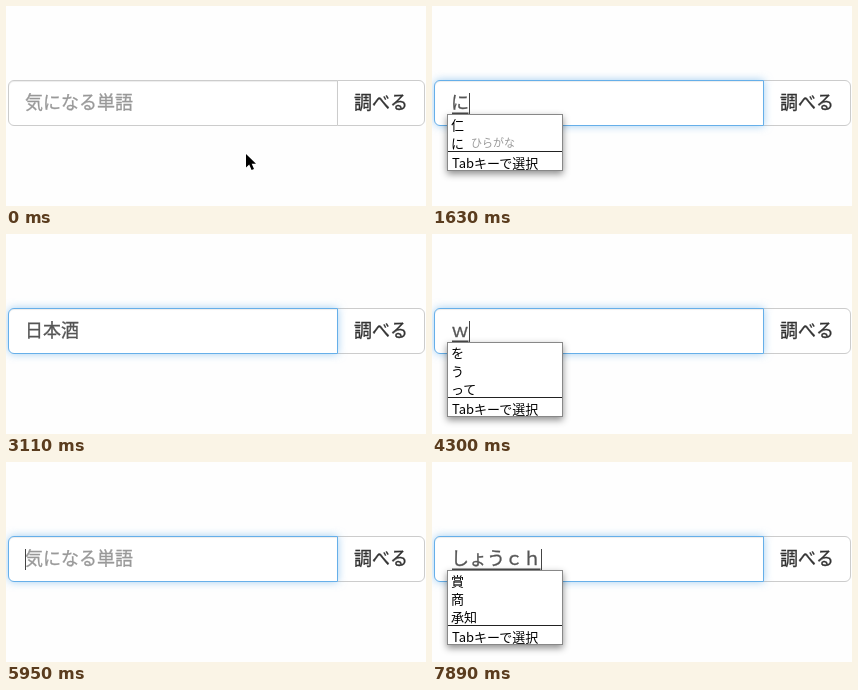
Recreate the animation shown at these times as an HTML page. Size 420 by 200 pixels, loop 8 s.

```html
<!DOCTYPE html>
<html lang="ja">
<meta charset="utf-8">
<style>
  html, body { margin: 0; width: 100%; height: 100%; overflow: hidden; background: #fefefe; }
  body { position: relative; font-family: "Noto Sans CJK JP", "Noto Sans CJK", sans-serif; }
  div { position: absolute; box-sizing: border-box; }
  svg { position: absolute; left: 0; top: 0; }
  #button, #field { top: 74px; height: 46px; border: 1px solid #ccc; background: #fff; }
  #button { left: 331px; width: 88px; border-radius: 0 6px 6px 0; }
  #field { left: 2px; width: 330px; border-radius: 6px 0 0 6px; }
  #popup { left: 15px; top: 108px; width: 116px; border: 1px solid #888; background: #fff;
    box-shadow: 0 3px 7px rgba(0, 0, 0, .45); }
  .big { font-size: 18px; stroke-width: .3px; }
  .row { font-size: 13px; }
</style>
<div id="button"></div>
<div id="field"></div>
<div id="popup"></div>
<svg width="420" height="200">
  <text class="big" x="348" y="103" fill="#333" stroke="#333">調べる</text>
  <g id="typed"></g>
  <g id="rows"></g>
  <path id="arrow" d="M0 0V13.5L3.2 10.6 5.6 16 8 15 5.7 9.8H10Z" stroke="#fff" stroke-width="1.2" paint-order="stroke"/>
  <g id="beam" fill="none">
    <path id="beamShape" d="M203 94.5Q206.5 94.5 206.5 97.5Q206.5 94.5 210 94.5M206.5 97V107M203 109.5Q206.5 109.5 206.5 106.5Q206.5 109.5 210 109.5M204.5 102.5H208.5" stroke="#fff" stroke-width="3"/>
    <use href="#beamShape" style="stroke:#222;stroke-width:1.3"/>
  </g>
</svg>
<script>
const $ = id => document.getElementById(id);
const LOOP = 8000;

// [start ms, text, caret shown, conversion candidates (present while composing)]
const states = [
  [0, '', false],
  [590, '', true],
  [1190, '', false],
  [1480, 'ｎ', true, []],
  [1630, 'に', true, ['仁', 'に']],
  [1770, 'にｈ', true, ['日本', '二本']],
  [2070, 'にほ', true, ['日本', '二本', '日本語']],
  [2220, 'にほん', true, ['日本', '二本', '日本語']],
  [2370, 'にほんｓ', true, ['日本酒', '日本書紀', '日本製']],
  [2510, '日本酒', true],
  [3110, '日本酒', false],
  [3410, '日本', true],
  [3560, '日', true],
  [3710, '', true],
  [4160, 'ｗ', true, []],
  [4300, 'ｗ', true, ['を', 'う', 'って']],
  [4450, 'わい', true, ['ワイン', '歪曲', 'わい']],
  [4600, 'わいん', true, ['ワイン', 'わいん', 'ワイングラス']],
  [4750, 'ワイン', true],
  [5350, 'ワイン', false],
  [5500, 'ワイ', true],
  [5800, 'ワ', true],
  [5950, '', true],
  [6400, 'ｓ', true, []],
  [6550, 'しょ', true, ['書', '所', '初']],
  [6700, 'しょう', true, ['消失', '小児', '小児認知']],
  [6850, 'しょうｔ', true, ['賞', '商', '小']],
  [7000, 'しょうつ', true, ['賞', '商', '小']],
  [7140, 'しょうｔ', true, ['賞', '商', '小']],
  [7590, 'しょう', true, ['消失', '小児', '小児認知']],
  [7740, 'しょうｃ', true, ['賞', '商', '承知']],
  [7890, 'しょうｃｈ', true, ['賞', '商', '承知']],
];

const rowText = (x, y, s) => `<text class="row" x="${x}" y="${y}">${s}</text>`;

function drawText([, text, caret, candidates]) {
  const color = text ? '#555' : '#999';
  const end = 19.5 + 18 * text.length;
  let out = `<text class="big" x="19" y="103" fill="${color}" stroke="${color}">${text || '気になる単語'}</text>`;
  if (candidates) out += `<rect x="20" y="106.5" width="${end - 21}" height="1.5" fill="#444"/>`;
  if (caret) out += `<path d="M${end} 87V108" stroke="#444"/>`;
  $('typed').innerHTML = out;
}

function drawPopup([, text, , candidates]) {
  const count = candidates ? candidates.length : 0;
  $('popup').style.display = count ? '' : 'none';
  $('popup').style.height = 21 + 18 * count + 'px';
  if (!count) return $('rows').innerHTML = '';
  const line = 109.5 + 18 * count;
  $('rows').innerHTML = candidates.map((c, i) => rowText(19, 124 + 18 * i, c)).join('') +
    (text === 'に' ? '<text x="39" y="141" font-size="11" fill="#999">ひらがな</text>' : '') +
    `<path d="M16 ${line}H130" stroke="#222"/>` + rowText(20, line + 16, 'Tabキーで選択');
}

function drawPointer(t) {
  const onField = t >= 300;
  $('arrow').style.display = onField ? 'none' : '';
  $('beam').style.display = onField ? '' : 'none';
  $('arrow').setAttribute('transform', t < 150 ? 'translate(240 148)' : 'translate(226 129)');
}

function drawFocus(t) {
  const focus = t < 440 ? 0 : t < 590 ? 0.5 : 1;
  const mix = (a, b) => a + (b - a) * focus;
  $('field').style.borderColor = `rgb(${mix(204, 102)},${mix(204, 175)},${mix(204, 233)})`;
  $('field').style.boxShadow =
    `inset 0 1px 1px rgba(0,0,0,.075), 0 0 8px rgba(102,175,233,${0.6 * focus})`;
}

let shown;
function frame() {
  const t = performance.now() % LOOP;
  const state = states.findLast(s => s[0] <= t);
  if (state !== shown) {
    drawText(state);
    drawPopup(state);
    shown = state;
  }
  drawPointer(t);
  drawFocus(t);
  requestAnimationFrame(frame);
}
frame();
</script>
</html>
```
